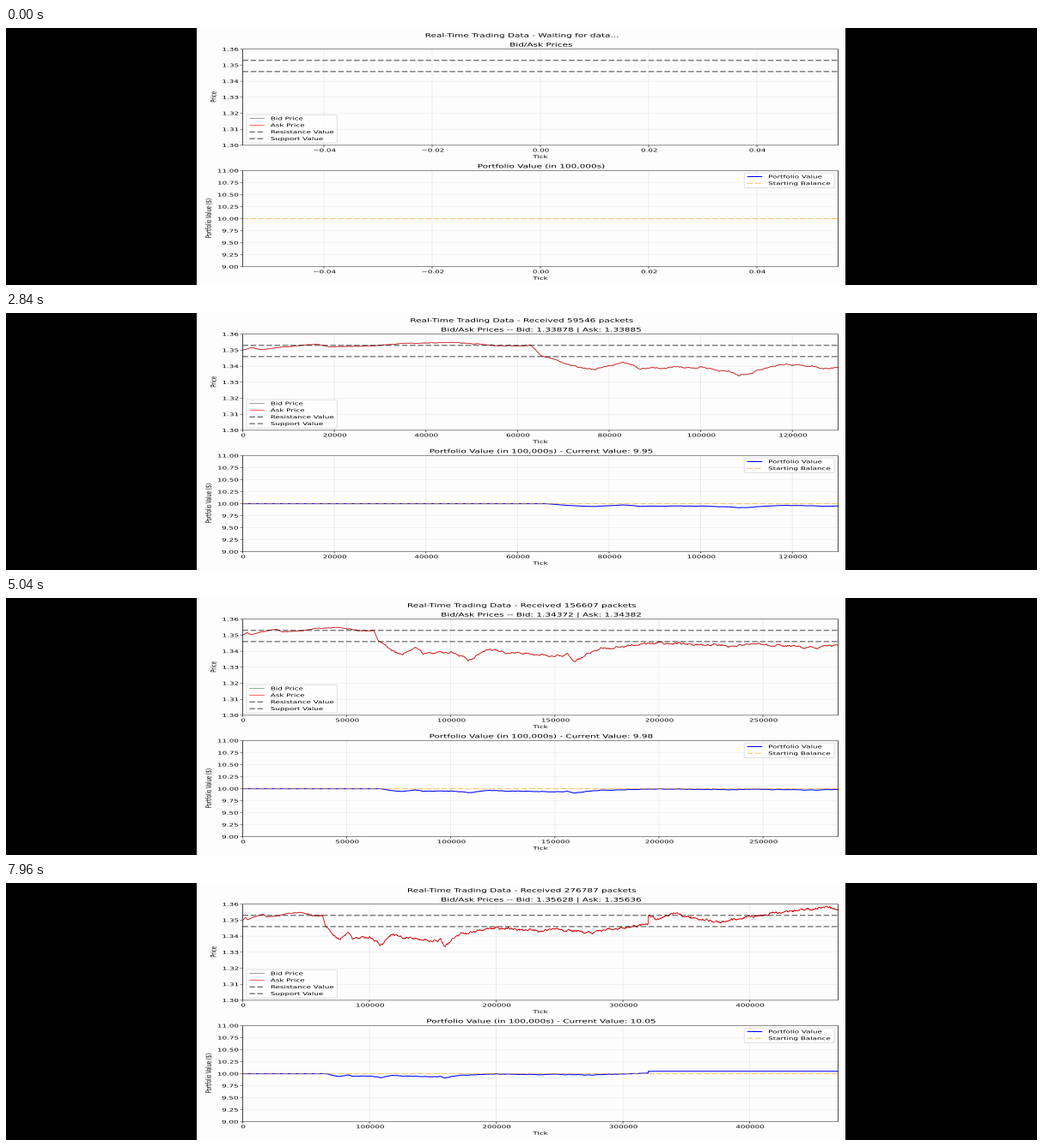
Write a matplotlib script that moves like this. It is 1200 px wide and 300 px high and loops after 8 s.

```python
import numpy as np
import matplotlib.pyplot as plt
from matplotlib.animation import FuncAnimation
from matplotlib.collections import LineCollection
from matplotlib.patches import FancyBboxPatch, PathPatch, Rectangle
from matplotlib.path import Path
from matplotlib.textpath import TextPath
from matplotlib.ticker import MaxNLocator
from matplotlib.transforms import Affine2D

W, H, DPI = 1200, 300, 100
FRAMES, STEP_MS = 200, 40

# The chart is a 1200 x 800 picture squeezed into a 755 x 300 panel.
PANEL_X, PANEL_W = 222, 755
SX, SY = PANEL_W / 1200, H / 800
PT = DPI / 72
PT_X, PT_Y = PT * SX, PT * SY

LEFT, RIGHT = 275.5, 968.5
PRICE_TOP, PRICE_BOTTOM = 24.7, 136.9
VALUE_TOP, VALUE_BOTTOM = 166.5, 278.7
SUPPORT, RESISTANCE = 1.346, 1.353
BUY_TICK, SELL_TICK = 66500, 320000
UNITS = 7.14

# Feed milestones: frame, ticks, packets, bid, spread in 1e-5.
FEED = np.array([
    (20, 0, 0, 1.35, 4),
    (36, 34560, 16338, 1.35437, 3),
    (55, 91480, 38565, 1.33922, 6),
    (86, 166100, 79216, 1.33846, 7),
    (126, 286100, 156607, 1.34372, 10),
    (153, 342500, 194375, 1.35459, 7),
    (199, 469800, 276787, 1.35628, 8),
])

# Turning points between them: thousand ticks, price above 1.33 in 1e-4.
TURNS = np.array([
    (2, 217), (4, 206), (16, 238), (19, 222), (30, 228), (47, 247),
    (55, 229), (63, 228), (65, 172), (73, 100), (77, 84), (83, 131),
    (87, 84), (102, 87), (108.5, 43), (118.5, 117), (128, 90), (150, 66),
    (156, 86), (159, 36), (171, 114), (202, 153), (236, 128), (243, 150),
    (276, 121), (319.9, 174), (320, 228), (326, 207), (349, 222),
    (376, 186), (420, 246), (460, 281),
])
knots = np.vstack([FEED[:, [1, 3]], TURNS * (1000, 1e-4) + (0, 1.33)])
knots = knots[knots[:, 0].argsort()]


def trend(tick):
    return np.interp(tick, *knots.T)


def portfolio(tick, price):
    held = 10 + UNITS * (price - SUPPORT)
    sold = 10 + UNITS * (RESISTANCE - SUPPORT)
    return np.where(tick < BUY_TICK, 10, np.where(tick < SELL_TICK, held, sold))


def jitter(count):
    shocks = np.random.default_rng(7).normal(size=count)
    return 0.44 * np.convolve(shocks, 0.9 ** np.arange(40))[:count]


ticks = np.arange(0, 470000, 150)
volatility = np.interp(ticks, (35000, 75000), (1.2e-4, 4e-4))
prices = trend(ticks) + volatility * jitter(len(ticks))
values = portfolio(ticks, prices)


def price_y(price):
    return PRICE_BOTTOM - (price - 1.30) / 0.06 * (PRICE_BOTTOM - PRICE_TOP)


def value_y(value):
    return VALUE_BOTTOM - (value - 9) / 2 * (VALUE_BOTTOM - VALUE_TOP)


fig = plt.figure(figsize=(W / DPI, H / DPI), dpi=DPI, facecolor="black")
ax = fig.add_axes([0, 0, 1, 1])
ax.set(xlim=(0, W), ylim=(H, 0))
ax.axis("off")
ax.add_patch(Rectangle((PANEL_X, 0), PANEL_W, H, fc="#fdfdfd", lw=0, zorder=0))

glyphs = {}


def text_path(text, size):
    """Outline and ink width of a string, cached."""
    key = (text, size)
    if key not in glyphs:
        path = TextPath((0, 0), text, size=size * PT)
        ink = path.vertices[path.codes != Path.CLOSEPOLY, 0]
        glyphs[key] = path, np.ptp(ink)
    return glyphs[key]


class Label:
    """Text squeezed like the rest of the chart; y is the baseline."""

    def __init__(self, x, y, text="", size=10, align=0.5, angle=0):
        self.x, self.y, self.size = x, y, size
        self.align, self.angle = align, angle
        self.patch = PathPatch(Path([(0, 0)]), fc="black", lw=0, zorder=6)
        ax.add_patch(self.patch)
        self.set(text)

    def set(self, text, x=None):
        self.patch.set_visible(bool(text))
        if not text:
            return
        path, width = text_path(text, self.size)
        place = (Affine2D().translate(-self.align * width, 0)
                 .rotate_deg(self.angle).scale(SX, -SY)
                 .translate(self.x if x is None else x, self.y))
        self.patch.set_path(place.transform_path(path))


def line(xs, ys, color, px, alpha=1, zorder=2, dashed=False):
    ratio = SX / SY
    style = (0, (3.7 * ratio, 1.6 * ratio)) if dashed else "-"
    return ax.plot(xs, ys, color=color, lw=px / PT, alpha=alpha, ls=style,
                   zorder=zorder, solid_capstyle="butt", snap=False)[0]


def segments(color, px, alpha=1, zorder=1):
    group = LineCollection([], colors=color, linewidths=px / PT,
                           alpha=alpha, zorder=zorder, snap=False)
    ax.add_collection(group, autolim=False)
    return group


BID = dict(color="black", px=PT_Y, alpha=0.7)
ASK = dict(color="red", px=0.7, alpha=0.85)
LEVEL = dict(color="black", px=2 * PT_Y, alpha=0.7, dashed=True)
VALUE = dict(color="blue", px=2 * PT_Y)
START = dict(color="orange", px=2 * PT_Y, alpha=0.6, dashed=True)
HAIR_H, HAIR_V = 0.8 * PT_Y, 0.8 * PT_X


def legend(x, y, width, rows):
    height = (8 + 15.08 * len(rows) - 5) * PT_Y
    ax.add_patch(FancyBboxPatch(
        (x, y), width, height, boxstyle="round,pad=0,rounding_size=1.4",
        fc=(1, 1, 1, 0.8), ec=(0.8, 0.8, 0.8, 0.8), lw=0.7 / PT,
        zorder=4, snap=False))
    for i, (text, style) in enumerate(rows):
        base = y + (11.9 + 15.08 * i) * PT_Y
        mid = base - 3.5 * PT_Y
        start = x + 4 * PT_X
        line((start, start + 20 * PT_X), (mid, mid), zorder=5, **style)
        Label(start + 28 * PT_X, base, text, align=0)


class Panel:
    """Frame, fixed y axis and a moving x axis."""

    def __init__(self, top, bottom, y_ticks, to_y, y_label, y_label_x):
        self.top, self.bottom = top, bottom
        ys = [to_y(v) for v in y_ticks]
        segments("#b0b0b0", HAIR_H, 0.3).set_segments(
            [((LEFT, y), (RIGHT, y)) for y in ys])
        segments("black", HAIR_H, zorder=3).set_segments(
            [((LEFT - 3.5 * PT_X, y), (LEFT, y)) for y in ys])
        for v, y in zip(y_ticks, ys):
            Label(LEFT - 7 * PT_X, y + 2, f"{v:.2f}", align=1)
        for y in (top, bottom):
            line((LEFT, RIGHT), (y, y), "black", HAIR_H, zorder=3)
        for x in (LEFT, RIGHT):
            line((x, x), (top, bottom), "black", HAIR_V, zorder=3)

        mid = (LEFT + RIGHT) / 2
        self.title = Label(mid, top - 6 * PT_Y, size=12)
        Label(mid, bottom + 29 * PT_Y, "Tick")
        Label(y_label_x, (top + bottom) / 2, y_label, angle=90)
        self.grid = segments("#b0b0b0", HAIR_V, 0.3)
        self.marks = segments("black", HAIR_V, zorder=3)
        self.labels = [Label(0, bottom + 14.5 * PT_Y) for _ in range(11)]

    def set_x(self, xs, texts):
        self.grid.set_segments([((x, self.top), (x, self.bottom)) for x in xs])
        self.marks.set_segments(
            [((x, self.bottom), (x, self.bottom + 3.5 * PT_Y)) for x in xs])
        for label in self.labels:
            label.set("")
        for label, x, text in zip(self.labels, xs, texts):
            label.set(text, x)


heading = Label(PANEL_X + PANEL_W / 2, 10.7, size=12)
price_panel = Panel(PRICE_TOP, PRICE_BOTTOM, np.linspace(1.30, 1.36, 7),
                    price_y, "Price", 244.5)
value_panel = Panel(VALUE_TOP, VALUE_BOTTOM, np.linspace(9, 11, 9),
                    value_y, "Portfolio Value ($)", 238.7)
panels = (price_panel, value_panel)

bid_line = line([], [], **BID)
ask_line = line([], [], **ASK)
for level in (RESISTANCE, SUPPORT):
    line((LEFT, RIGHT), [price_y(level)] * 2, **LEVEL)
value_line = line([], [], **VALUE)
line((LEFT, RIGHT), [value_y(10)] * 2, **START)

legend(279.9, 101.2, 105.4, [
    ("Bid Price", BID), ("Ask Price", ASK),
    ("Resistance Value", LEVEL), ("Support Value", LEVEL)])
legend(859.2, 169.1, 104.9, [
    ("Portfolio Value", VALUE), ("Starting Balance", START)])

locator = MaxNLocator(nbins=9, steps=[1, 2, 2.5, 5, 10])


def show_waiting():
    heading.set("Real-Time Trading Data - Waiting for data...")
    price_panel.title.set("Bid/Ask Prices")
    value_panel.title.set("Portfolio Value (in 100,000s)")
    marks = np.arange(-2, 3) / 50
    xs = LEFT + (marks + 0.055) / 0.11 * (RIGHT - LEFT)
    texts = [f"{m:.2f}".replace("-", "\u2212") for m in marks]
    for panel in panels:
        panel.set_x(xs, texts)
    for curve in (bid_line, ask_line, value_line):
        curve.set_data([], [])


def show_feed(frame):
    count, packets, spread = (
        np.interp(frame, FEED[:, 0], FEED[:, i]) for i in (1, 2, 4))
    bid = float(trend(count))
    ask = bid + round(spread) * 1e-5
    value = float(portfolio(count, bid))
    heading.set(f"Real-Time Trading Data - Received {int(packets)} packets")
    price_panel.title.set(
        f"Bid/Ask Prices -- Bid: {round(bid, 5)} | Ask: {round(ask, 5)}")
    value_panel.title.set("Portfolio Value (in 100,000s) - "
                          f"Current Value: {round(value, 2)}")

    scale = (RIGHT - LEFT) / count
    marks = [m for m in locator.tick_values(0, count) if 0 <= m <= count]
    for panel in panels:
        panel.set_x([LEFT + m * scale for m in marks], [f"{m:.0f}" for m in marks])

    seen = ticks <= count
    xs = np.append(LEFT + ticks[seen] * scale, RIGHT)
    path = np.append(prices[seen], bid)
    bid_line.set_data(xs, price_y(path))
    ask_line.set_data(xs, price_y(path + 7e-5))
    value_line.set_data(xs, value_y(np.append(values[seen], value)))


def draw(frame):
    # The feed hiccups every fifth frame while it warms up.
    if frame < 42 and frame % 5 == 4:
        frame -= 1
    if frame <= FEED[0, 0]:
        show_waiting()
    else:
        show_feed(frame)
    return []


anim = FuncAnimation(fig, draw, frames=FRAMES, interval=STEP_MS,
                     init_func=lambda: [], repeat=True, repeat_delay=0)
plt.show()
```
